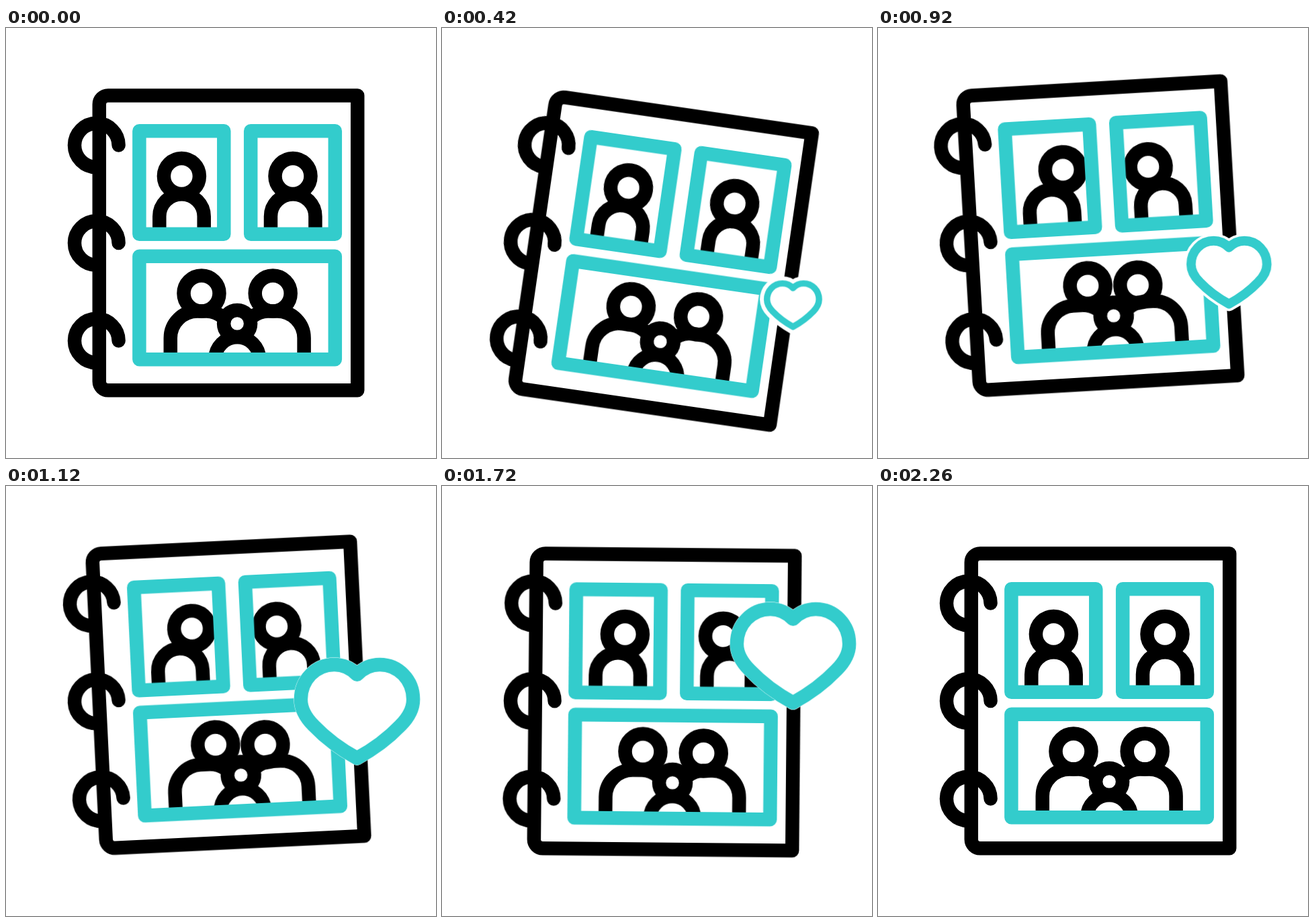
An HTML page that plays this animation: 640x640 px, repeating every 2400 ms.

```html
<!DOCTYPE html>
<html lang="en">
<head>
<meta charset="utf-8">
<title>Photo album</title>
<style>
  html, body { margin: 0; width: 100%; height: 100%; overflow: hidden; background: #fff; }
  svg { display: block; width: 100%; height: 100%; }

  .line { fill: none; stroke: #000; stroke-width: 20.5; stroke-linejoin: round; }
  .teal { stroke: #3cc; }
  .ring { stroke-linecap: round; }

  .book, .head, .rise, .pulse {
    animation: 2400ms cubic-bezier(.333, 0, .667, 1) infinite;
  }
  .book { transform-origin: 148px 320px; animation-name: swing; }
  .head { animation-name: lean; }
  .rise { animation-name: rise; }
  .pulse { animation-name: pulse; }
  .pulse path { vector-effect: non-scaling-stroke; }
  .pulse .edge { fill: #fff; stroke: #fff; stroke-width: 21.2; }

  @keyframes swing {
    0% { transform: rotate(0deg); }
    19.58% { transform: rotate(8.5deg); }
    41.04% { transform: rotate(-3.85deg); }
    61.88% { transform: rotate(2.1deg); }
    76.46%, 100% { transform: rotate(0deg); }
  }
  @keyframes lean {
    0%, 10.83% { transform: none; animation-timing-function: cubic-bezier(.33, 0, .5, 1); }
    41.67%, 54.17% { transform: translate(var(--x), var(--y)); animation-timing-function: cubic-bezier(.33, 0, .5, 1); }
    94.17%, 100% { transform: none; }
  }
  @keyframes rise {
    0%, 10.42% { transform: translate(522.4px, 416.6px); }
    91.67%, 100% { transform: translate(522.4px, 223.6px); }
  }
  @keyframes pulse {
    0%, 10.42% { transform: scale(0); }
    25% { transform: scale(.955); }
    35% { transform: scale(.6); }
    47.5% { transform: scale(1); }
    60% { transform: scale(.62); }
    72.5% { transform: scale(1); }
    87.08%, 100% { transform: scale(0); }
  }
</style>
</head>
<body>
<svg viewBox="0 0 640 640">
  <defs>
    <path id="ring" d="M167.6 174.6a32.8 32.8 0 1 0-32.8 32.8"/>
    <path id="bust" d="M228.3 305V280.5a33.2 33.2 0 0 1 66.4 0V305"/>
    <path id="parent" d="M244.8 492V461.5a40 40 0 0 1 40-40H299Q312 422 322 430"/>
    <path id="heart" d="M0-55C-9-64.5-21-70-34-70C-62-70-84-47-84-18C-84-3-76 10-65 21C-46 41-22 58 0 70C22 58 46 41 65 21C76 10 84-3 84-18C84-47 62-70 34-70C21-70 9-64.5 0-55Z"/>
  </defs>

  <g class="book line">
    <path d="M523.2 100.5V539.3H152a13.2 13.2 0 0 1-13.2-13.2V113.7a13.2 13.2 0 0 1 13.2-13.2Z"/>
    <g class="ring">
      <use href="#ring"/>
      <use href="#ring" y="145.5"/>
      <use href="#ring" y="291"/>
    </g>

    <use href="#bust"/>
    <use href="#bust" x="165.7"/>
    <circle class="head" style="--x:20.3px;--y:-2px" cx="261.4" cy="220.4" r="26.5"/>
    <circle class="head" style="--x:-19px;--y:1px" cx="427" cy="220.4" r="26.5"/>

    <use href="#parent"/>
    <use href="#parent" transform="matrix(-1 0 0 1 688.4 0)"/>
    <path d="M311.2 493a33 33 0 0 1 66 0"/>
    <circle cx="344.1" cy="440" r="20"/>
    <circle class="head" style="--x:17.5px;--y:-2px" cx="291" cy="395" r="26.5"/>
    <circle class="head" style="--x:-14.7px;--y:1.4px" cx="397.2" cy="395" r="26.5"/>

    <g class="teal">
      <path d="M198.4 153.3H324.3V306.8H198.4Z"/>
      <path d="M364.2 153.3H489.8V306.8H364.2Z"/>
      <path d="M198.4 339.8H489.8V493.3H198.4Z"/>
    </g>
  </g>

  <g class="rise">
    <g class="pulse">
      <path class="line edge" d="M0-55C-9-64.5-21-70-34-70C-62-70-84-47-84-18C-84-3-76 10-65 21C-46 41-22 58 0 70C22 58 46 41 65 21C76 10 84-3 84-18C84-47 62-70 34-70C21-70 9-64.5 0-55Z"/>
      <use class="line teal" href="#heart" style="vector-effect:non-scaling-stroke"/>
    </g>
  </g>
</svg>
</body>
</html>
```
